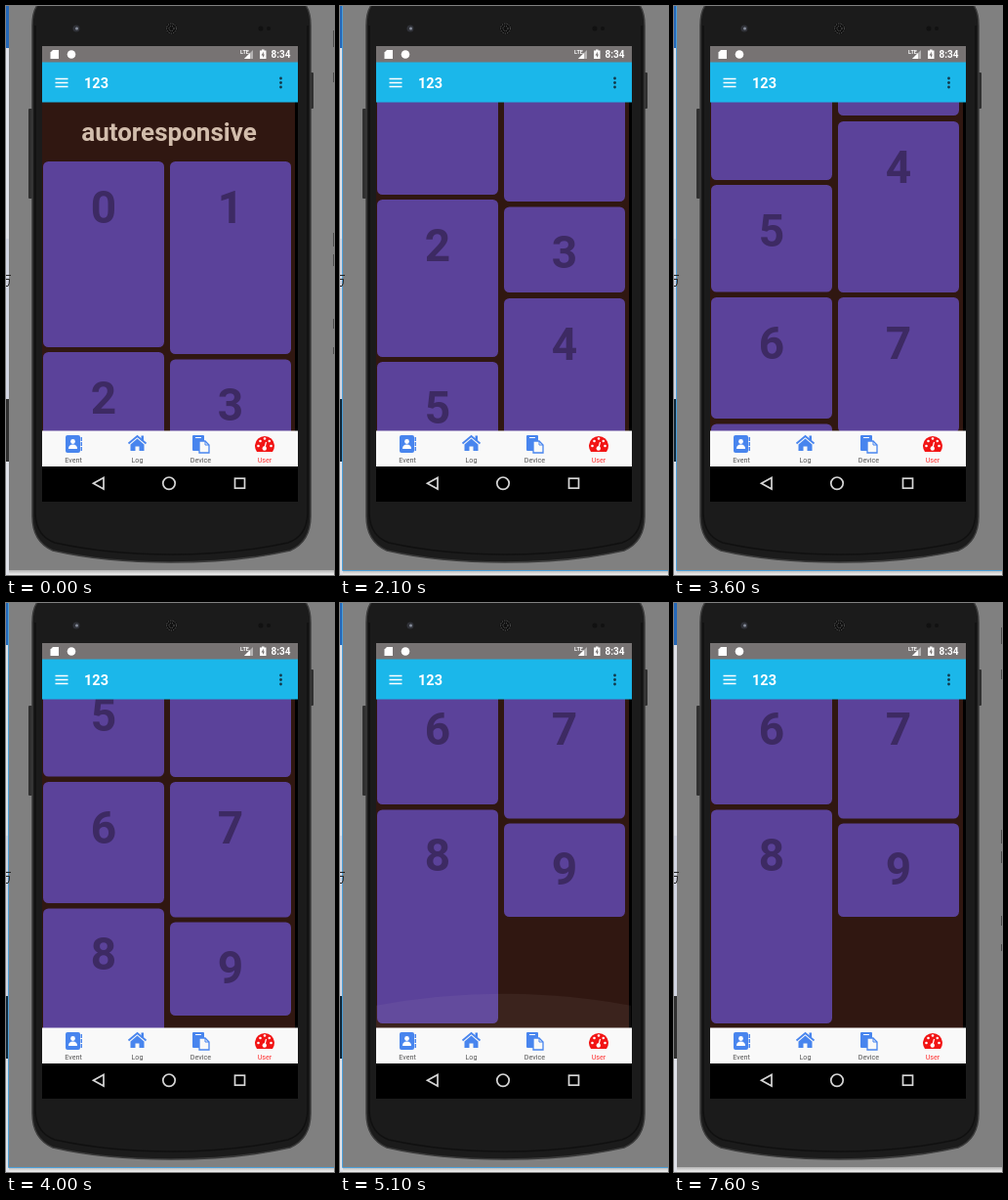
Write an HTML page that moves like this. It is 336 px wide and 582 px high and loops after 7800 ms.

```html
<!DOCTYPE html>
<html lang="en">
<head>
<meta charset="utf-8">
<style>
html, body { margin: 0; width: 100%; height: 100%; overflow: hidden; background: #808080; }
svg.stage { display: block; width: 100%; height: 100%; }
text { font-family: Roboto, sans-serif; }
.mid { text-anchor: middle; }
.bold { font-weight: 700; }
</style>
</head>
<body>
<svg class="stage" viewBox="0 0 336 582">
  <defs>
    <clipPath id="view"><rect x="37" y="98" width="262" height="337"/></clipPath>
    <linearGradient id="shade" x2="0" y2="1">
      <stop stop-color="#b4b4b4"/><stop offset="1" stop-color="#f2f2f2"/>
    </linearGradient>
  </defs>

  <!-- desktop behind the emulator -->
  <rect width="336" height="582" fill="#808080"/>
  <rect y="577" width="336" height="5" fill="url(#shade)"/>
  <rect width="3" height="43" fill="#2568b8"/>
  <rect y="43" width="3" height="539" fill="#dfe1e8"/>
  <rect y="238" width="3" height="164" fill="#d2d5e2"/>
  <g id="idle">
    <rect y="402" width="3" height="64" fill="#303030"/>
    <path d="M335.5 25V42M335.5 68V78M335.5 232V246M335.5 254V266M335.5 320V330M335.5 349V356" stroke="#4b4b4b"/>
  </g>
  <g id="focused">
    <rect y="402" width="3" height="64" fill="#10283a"/>
    <path d="M2.5 0V577.5H336" fill="none" stroke="#4c9fd8"/>
  </g>
  <path d="M0 275.5H5M0 279.5H3.500Q3.500 285 2 286.500H0" fill="none" stroke="#222"/>

  <!-- phone -->
  <rect x="23" y="105" width="4" height="92" rx="1" fill="#303030"/>
  <rect x="311" y="68" width="4" height="37" rx="1" fill="#303030"/>
  <path d="M33-2Q27 5 27 20V522Q27 548 48 557Q100 569 169 569T291 557Q312 548 312 522V20Q312 5 306-2Z" fill="#1b1b1b" stroke="#3b3b3b" stroke-width="1.5"/>
  <path d="M30 20V520Q31 542 50 549Q105 561 169 561T289 549Q308 542 309 520V20" fill="none" stroke="#101010" stroke-width="1.5"/>
  <circle cx="72" cy="23" r="3.500" fill="#303238"/><circle cx="72.500" cy="23" r="1.500" fill="#858b99"/>
  <circle cx="169.500" cy="23" r="6" fill="#101010"/>
  <g fill="none" stroke="#686868" stroke-dasharray="1.2 1.2">
    <circle cx="169.500" cy="23" r="5"/><circle cx="169.500" cy="23" r="2.500"/>
  </g>
  <circle cx="261" cy="23" r="2.500" fill="#111"/><circle cx="269" cy="23" r="2" fill="#111"/>
  <rect x="37" y="41" width="262" height="466"/>

  <!-- scrolling page -->
  <g clip-path="url(#view)">
    <rect x="37" y="98" width="259" height="337" fill="#301711"/>
    <g id="page">
      <text class="mid bold" x="167" y="138" font-size="26" fill="#d2bdac">autoresponsive</text>
    </g>
    <path id="glow" fill="#d8d0cc"/>
  </g>

  <!-- status bar -->
  <rect x="37" y="41" width="262" height="17" fill="#777373"/>
  <g fill="#fff">
    <path d="M48 45H54V54H45.500V47.500Z"/>
    <circle cx="67" cy="49.500" r="4.300"/>
    <path d="M253 45V54H244Z" fill-opacity=".45"/><path d="M250 48V54H244Z"/>
    <text class="bold" x="240" y="49" font-size="5.500">LTE</text>
    <path d="M262 44.500H264.500V45.500H266.500V54H260V45.500H262Z"/>
    <path d="M264 46.500L261.500 50.500H263V53L265 49.500H263.700Z" fill="#777373"/>
    <text class="bold" x="271.500" y="53" font-size="10">8:34</text>
  </g>

  <!-- app bar -->
  <rect x="37" y="57.500" width="262" height="41" fill="#1bb7ea"/>
  <path d="M50.500 74.500H63.500M50.500 78.500H63.500M50.500 82.500H63.500" stroke="#fff" stroke-width="1.400"/>
  <text class="bold" x="80" y="84" font-size="14.500" fill="#fff">123</text>
  <g fill="#12384a"><circle cx="281.500" cy="74" r="1.400"/><circle cx="281.500" cy="78.500" r="1.400"/><circle cx="281.500" cy="83" r="1.400"/></g>

  <!-- tab bar -->
  <rect x="37" y="434.500" width="262" height="36.500" fill="#f9f9f9"/>
  <g fill="#4885ee">
    <rect x="61" y="439" width="15" height="18" rx="2"/>
    <path d="M76.500 441H78V445H76.500ZM76.500 446H78V450H76.500ZM76.500 451H78V455H76.500Z"/>
    <g fill="#fff"><circle cx="68.500" cy="445.500" r="2.400"/><path d="M64 453Q64 448.500 68.500 448.500T73 453Z"/></g>
    <path d="M134.500 442.500L141.500 448.500V455H136.500V450.500H132.500V455H127.500V448.500Z"/>
    <path d="M125.500 447.500L134.500 440L143.500 447.500" fill="none" stroke="#4885ee" stroke-width="1.800"/>
    <rect x="138.500" y="439.500" width="2.500" height="5"/>
    <rect x="191" y="439" width="12" height="16" rx="1"/>
    <path d="M194 441.500H200" stroke="#fff"/>
    <path d="M198 445H204L208 449V457H198Z" fill="#f9f9f9" stroke="#4885ee" stroke-width="1.300"/>
    <path d="M204 445V449H208" fill="none" stroke="#4885ee"/>
  </g>
  <path d="M257 456A10 10 0 1 1 273 456Z" fill="#f21414"/>
  <g fill="#fff"><circle cx="258.500" cy="450" r="1.300"/><circle cx="260.500" cy="445" r="1.300"/><circle cx="265" cy="442.500" r="1.300"/><circle cx="271.500" cy="450" r="1.300"/><circle cx="269.800" cy="445" r="1.300"/><circle cx="264.800" cy="452.500" r="2.200"/></g>
  <path d="M264.800 452.500L266.500 446" stroke="#fff" stroke-width="1.200"/>
  <g class="mid" font-size="7.200" fill="#555">
    <text x="69" y="467">Event</text><text x="134.500" y="467">Log</text>
    <text x="199.500" y="467">Device</text><text x="265" y="467" fill="#f33">User</text>
  </g>

  <!-- navigation bar -->
  <g fill="none" stroke="#d6d6d6" stroke-width="1.700">
    <path d="M100 482.500V494L89.500 488.200Z"/>
    <circle cx="167" cy="488.200" r="6.200"/>
    <rect x="234.500" y="483.200" width="10" height="10"/>
  </g>
</svg>
<script>
const LOOP = 7800, STEP = 100;
const LEFT = 38, RIGHT = 168;
// [column x, top, height] of each numbered card
const cards = [
  [LEFT, 159, 190], [RIGHT, 159, 197], [LEFT, 354, 161], [RIGHT, 361.5, 87.5], [RIGHT, 455, 175],
  [LEFT, 520, 109.5], [LEFT, 635, 124], [RIGHT, 635, 138.5], [LEFT, 764.5, 218.5], [RIGHT, 778.5, 95.5]
];
// each drag: start time, then the scroll offset at every step
const drags = [
  [1500, 26, 36],
  [1800, 50, 78, 114, 156, 222, 272, 306],
  [3600, 337, 372, 405, 432, 452, 462],
  [4300, 490, 528, 553]
];

const $ = id => document.getElementById(id);
const page = $("page"), glow = $("glow"), idle = $("idle"), focused = $("focused");

cards.forEach(([x, y, h], i) => page.insertAdjacentHTML("beforeend",
  `<rect x="${x}" y="${y}" width="124" height="${h}" rx="5.500" fill="#5b429a"/>
   <text class="mid bold" x="${x + 62}" y="${y + 62.5}" font-size="46" fill="#3d2a63">${i}</text>`));

function scrollAt(t) {
  let offset = 0;
  for (const [start, ...offsets] of drags) {
    if (t >= start) offset = offsets[Math.min(offsets.length - 1, Math.floor((t - start) / STEP))];
  }
  return offset;
}

function drawGlow(t) {
  const visible = t >= 4500 && t < 5500;
  glow.style.display = visible ? "" : "none";
  if (!visible) return;
  const grow = Math.min(1, (t - 4500) / 400);
  const fade = t < 5100 ? 1 : (5500 - t) / 500;
  const height = (32 + 12 * grow) * fade;
  const edge = 435 - Math.max(0, height - 12);
  const peak = 2 * (435 - height) - edge;
  glow.setAttribute("d", `M37 435V${edge}Q167.5 ${peak} 298 ${edge}V435Z`);
  glow.setAttribute("opacity", 0.08 * fade);
}

function draw(now) {
  const t = Math.floor((now % LOOP) / STEP) * STEP;
  const active = t >= 1000 && t < 7600;
  idle.style.display = active ? "none" : "";
  focused.style.display = active ? "" : "none";
  page.setAttribute("transform", `translate(0 ${-scrollAt(t)})`);
  drawGlow(t);
}

const begin = performance.now();
function tick() {
  draw(performance.now() - begin);
  requestAnimationFrame(tick);
}
tick();
</script>
</body>
</html>
```
